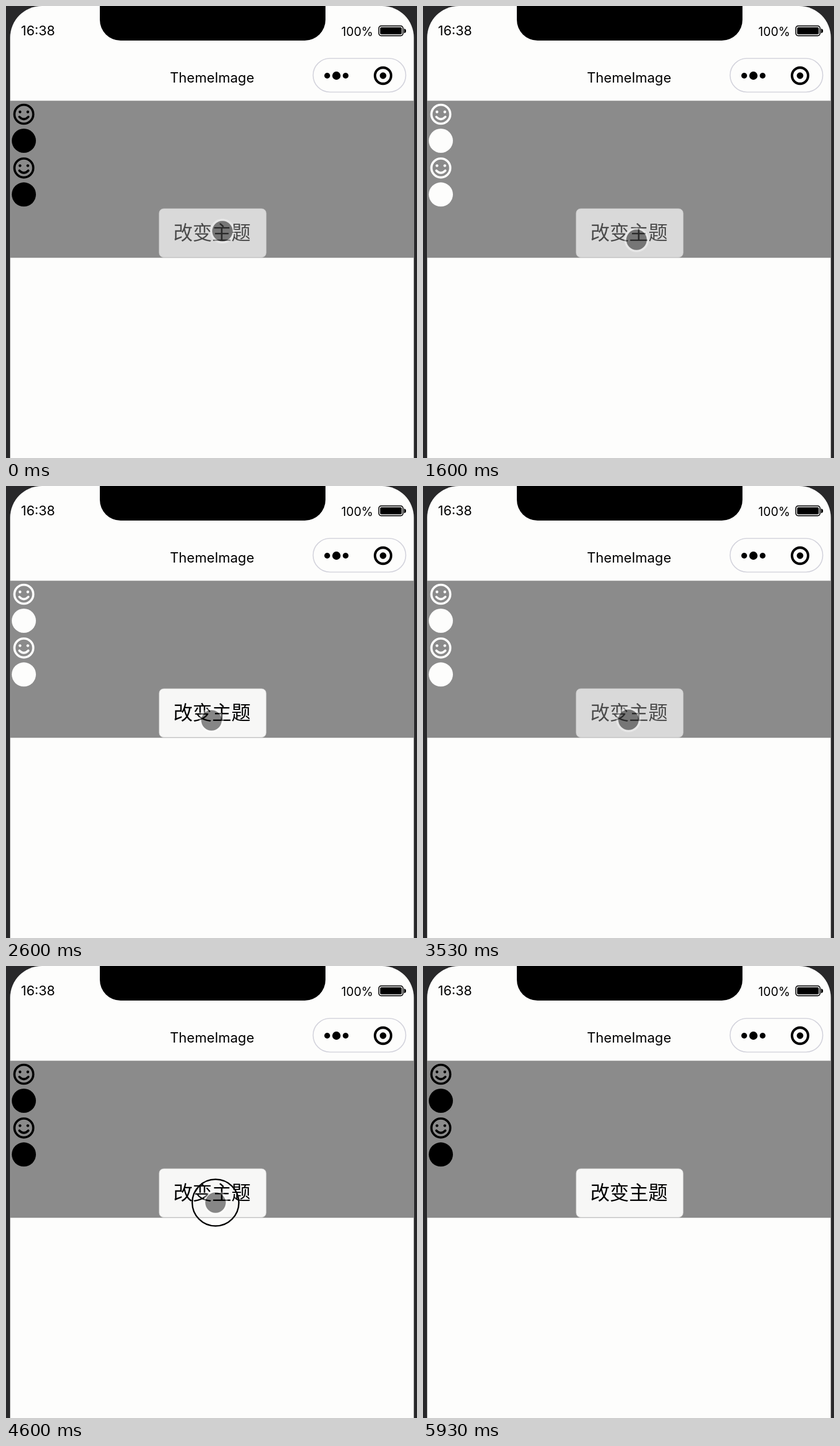
Recreate the animation shown at these times as an HTML page. Size 714x785 px, loop 5.99 s.

```html
<!DOCTYPE html>
<html lang="zh-CN">
<head>
<meta charset="utf-8">
<style>
  html, body { margin: 0; width: 100%; height: 100%; overflow: hidden; background: #28282a; }
  svg { display: block; }
  text { font-family: Inter, Roboto, sans-serif; }
  .label { font-family: "Noto Sans CJK SC", "Noto Sans CJK", sans-serif; }
  .line { fill: none; stroke: currentColor; stroke-width: 3.9; stroke-linecap: round; }
</style>
</head>
<body>
<svg width="714" height="785" viewBox="0 0 714 785">
  <defs>
    <g id="pair" fill="currentColor">
      <circle class="line" cx="31" cy="188" r="16.4"/>
      <circle cx="24.3" cy="184" r="2.4"/>
      <circle cx="37.9" cy="184" r="2.4"/>
      <path class="line" d="M23.2 192.5Q31 200.5 38.8 192.5"/>
      <circle cx="31" cy="234" r="21"/>
    </g>
  </defs>

  <rect x="7.2" width="701.3" height="900" rx="55" fill="#fdfdfc"/>
  <path d="M163 0V24A36 36 0 0 0 199 60H519A36 36 0 0 0 555 24V0Z"/>
  <text x="26" y="50.7" font-size="23.2">16:38</text>
  <text x="582.5" y="52" font-size="20.9">100%</text>
  <rect x="647.7" y="34.6" width="42" height="17" rx="4" fill="none" stroke="#000" stroke-width="1.7"/>
  <rect x="650" y="36.9" width="37.5" height="12.4" rx="2"/>
  <path d="M691.5 39.2Q695 39.7 695 43.2T691.5 47.2Z"/>

  <text x="358" y="132.7" font-size="23.7" text-anchor="middle">ThemeImage</text>
  <rect x="533.5" y="91" width="161" height="58.5" rx="29.2" fill="#fdfdfc" stroke="#d3d3dc" stroke-width="1.7"/>
  <circle cx="558" cy="121" r="5"/>
  <circle cx="574" cy="121" r="7.2"/>
  <circle cx="590" cy="121" r="5"/>
  <circle cx="655" cy="121" r="14" fill="none" stroke="#000" stroke-width="4.3"/>
  <circle cx="655" cy="121" r="5.7"/>

  <rect x="7.2" y="164.5" width="701.3" height="272.8" fill="#8b8b8b"/>
  <g id="icons">
    <use href="#pair"/>
    <use href="#pair" y="93.3"/>
  </g>
  <rect id="button" x="266" y="352" width="186" height="84.5" rx="8" stroke="#c8c8c8" stroke-width=".8"/>
  <text id="label" class="label" x="357.9" y="406" font-size="33.6" text-anchor="middle">改变主题</text>

  <g id="cursor">
    <circle r="19.5" fill="none" stroke="#fff" stroke-opacity=".35" stroke-width="4"/>
    <circle r="17.8" fill="#000" fill-opacity=".46"/>
    <circle id="ring" r="40.5" fill="none" stroke="#000" stroke-width="2.5"/>
  </g>
</svg>
<script>
const LOOP = 5990, FPS = 15;
// Ticks at which a tap is released; each one flips the theme.
const taps = [0, 7, 14, 24, 31, 37, 45, 53, 61, 70, 78];
// Cursor path: tick, x, y
const path = [
  [0, 376, 391], [2, 376, 391], [14, 312, 418], [24, 371, 406], [39, 357, 407],
  [53, 357, 406], [69, 364, 411], [82, 364, 411], [88, 440, 840], [90, 440, 840]
];
const $ = id => document.getElementById(id);

function cursorAt(tick) {
  const i = path.findIndex(p => p[0] > tick);
  const [t0, x0, y0] = path[i - 1], [t1, x1, y1] = path[i];
  const u = (tick - t0) / (t1 - t0), e = u * u * (3 - 2 * u);
  return [x0 + (x1 - x0) * e, y0 + (y1 - y0) * e];
}

function draw(ms) {
  const tick = Math.min(89, Math.floor((ms % LOOP + 4) * FPS / 1000));
  const dark = taps.filter(t => t <= tick).length % 2;
  const held = taps.some(t => tick === t || tick === t + 1);
  const down = taps.some(t => tick === t - 1 || tick === t - 2);
  $('icons').setAttribute('color', dark ? '#000' : '#fdfdfc');
  $('button').setAttribute('fill', held ? '#d9d9d9' : '#f7f7f6');
  $('label').setAttribute('fill', held ? '#4b4b4b' : '#000');
  $('ring').setAttribute('visibility', down ? 'visible' : 'hidden');
  $('cursor').setAttribute('transform', `translate(${cursorAt(tick)})`);
}

const start = performance.now();
function loop() {
  draw(performance.now() - start);
  requestAnimationFrame(loop);
}
loop();
</script>
</body>
</html>
```
